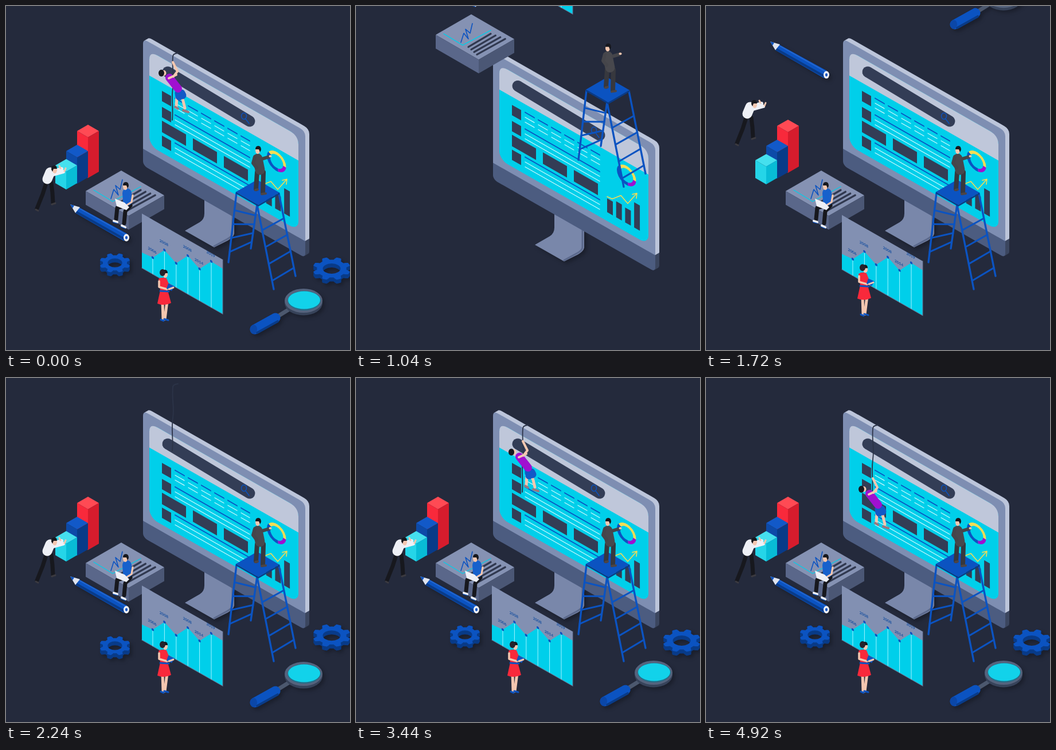
Write an HTML page that moves like this. It is 600 px wide and 600 px high and loops after 5200 ms.

```html
<!DOCTYPE html>
<html lang="en">
<head>
<meta charset="utf-8">
<title>Isometric analytics</title>
<style>
  html, body { margin: 0; width: 100%; height: 100%; overflow: hidden; background: #242a3c; }
  svg { display: block; width: 100%; height: 100%; }
  .shadow { filter: drop-shadow(4px 4px 3px #0004); }
  .line { fill: none; stroke-linecap: round; stroke-linejoin: round; }
  text { font: 700 6.5px Lato, "Open Sans", sans-serif; fill: #174f9f; text-anchor: middle; }
</style>
</head>
<body>
<svg id="stage" viewBox="0 0 600 600"></svg>
<script>
const BLUE = '#0b53c1', NAVY = '#093b88', CYAN = '#00cfea', DARK = '#333d56', SKIN = '#f4c7b0';
const GREY = '#8290b2', INK = '#17181e', WHITE = '#eef0f6', YELLOW = '#f3dd55', PURPLE = '#a010d0', RED = '#f8293b';
const LOOP = 5200, FRAME = 40, FALL = 600, SLOPE = .57;

const range = (count, make) => Array.from({ length: count }, (_, i) => make(i));
const repeat = (count, make) => range(count, make).join('');
const mix = (a, b, t) => a.map((value, i) => value + (b[i] - value) * t);

const path = (d, fill, more = '') => `<path d="${d}" fill="${fill}" ${more}/>`;
const line = (d, color, width, more = '') =>
  `<path class="line" d="${d}" stroke="${color}" stroke-width="${width}" ${more}/>`;
const oval = (x, y, rx, ry, fill, more = '') =>
  `<ellipse cx="${x}" cy="${y}" rx="${rx}" ry="${ry}" fill="${fill}" ${more}/>`;
const rect = (x, y, w, h, fill = DARK, r = 0) =>
  `<rect x="${x}" y="${y}" width="${w}" height="${h}" rx="${r}" fill="${fill}"/>`;
const tab = (x, y, w, h, r, fill) =>
  path(`M${x},${y + h}v${r - h}q0,${-r} ${r},${-r}h${w - 2 * r}q${r},0 ${r},${r}v${h - r}Z`, fill);
const iso = (x, y, content) => `<g transform="matrix(1 ${SLOPE} 0 1 ${x} ${y})">${content}</g>`;
const extrude = (depth, dx, dy, content) => repeat(depth, i =>
  `<g transform="translate(${dx * (depth - i)} ${dy * (depth - i)})">${content}</g>`);
const shaded = content => `<g class="shadow">${content}</g>`;

// Box seen from a corner; x, y is the back corner of its lid
function box(x, y, left, right, height, [lid, leftSide, rightSide]) {
  const dl = left * .577, dr = right * .577;
  return path(`M${x},${y}l${-left},${dl} ${right},${dr} ${left},${-dl}Z`, lid) +
    path(`M${x - left},${y + dl}l${right},${dr}v${height}l${-right},${-dr}Z`, leftSide) +
    path(`M${x + right},${y + dr}l${-left},${dl}v${height}l${left},${-dl}Z`, rightSide);
}

function gear(x, y, rx, ry) {
  const teeth = range(96, i => {
    const angle = i * Math.PI / 48;
    const reach = .89 + .11 * Math.max(-1, Math.min(1, -3 * Math.cos(8 * angle)));
    return [x + rx * reach * Math.cos(angle), y + ry * reach * Math.sin(angle)].map(n => n.toFixed(1));
  });
  const hx = rx * .47, hy = ry * .45;
  const hole = `M${x - hx},${y}a${hx},${hy} 0 1 0 ${2 * hx},0a${hx},${hy} 0 1 0 ${-2 * hx},0Z`;
  const layer = fill => path(`M${teeth.join('L')}Z${hole}`, fill, 'fill-rule="evenodd"');
  return shaded(extrude(7, 0, 1, layer(NAVY)) + layer(BLUE));
}

// facing: 1 looks right, -1 looks left
const head = (x, y, facing) =>
  oval(x + facing, y + 1, 4, 6, SKIN) + path(`M${x + 5 * facing},${y - 1}q0,-6 ${-5 * facing},-6t${-5 * facing},7l${2 * facing},4 ${2 * facing},-5Z`, INK);

function monitor() {
  const stand = line('M372,345V385', '#7987aa', 0) +
    path('M346,336L398,366V397Q397,403 387,409L363,421 312,392 338,377Q346,372 346,362Z', '#7987aa') +
    line('M395,366V396Q395,402 385,407L363,419', '#5b698c', 3);
  const shell = extrude(7, 1, -SLOPE, iso(239, 57, rect(0, 20, 283, 201, '#3b465f', 7) + tab(0, 0, 283, 192, 9, '#bcc5da'))) +
    iso(239, 57, rect(0, 20, 283, 201, '#4c5c80', 7) + tab(0, 0, 283, 192, 9, '#7e8eb2') +
      rect(11, 15, 260, 165, CYAN, 15) + tab(11, 15, 260, 43, 15, '#bfc7da'));
  const search = line('M282,115L425,201', DARK, 19) +
    oval(415, 192, 4.5, 5.5, 'none', `stroke="${BLUE}" stroke-width="1.5"`) + line('M418,197L424,205', BLUE, 1.5);
  const paragraph = (y, dash) => repeat(3, i =>
    line(`M23,${y + 8.5 * i}H153`, i ? '#d8fbff' : BLUE, i ? 1.3 : 2, `stroke-dasharray="${dash}"`));
  const page = paragraph(0, '16 7') + paragraph(29, '') + paragraph(78, '') +
    [0, 28, 78].map(y => rect(0, y, 16, 18)).join('') + repeat(3, i => rect(54 * i, 52, 42, 20));
  const bars = [24, 28, 26, 44].map((h, i) => rect(15.7 * i, -h, 10, h)).join('');
  const arc = (from, to, color, width) => {
    const at = degrees => [14 * Math.cos(degrees * Math.PI / 180), 14 * Math.sin(degrees * Math.PI / 180)];
    return line(`M${at(from)}A14,14 0 0 1 ${at(to)}`, color, width, 'style="stroke-linecap:butt"');
  };
  const ring = arc(80, 212, BLUE, 6) + arc(5, 80, PURPLE, 5) + arc(212, 365, YELLOW, 5);
  return shaded(stand) + shell + search + iso(272, 148, page) + iso(438, 335, bars) + iso(472, 271, ring) +
    line('M438,308L447,312 462,306 474,320 490,302M482,304L490,302 489,311', YELLOW, 1.6);
}

function ladder() {
  const side = (topA, footA, topB, footB, first) =>
    line(`M${topA}L${footA}M${topB}L${footB}`, BLUE, 3.4) + repeat(4, i => {
      const t = first + .2 * i;
      return line(`M${mix(topA, footA, t)}L${mix(topB, footB, t)}`, BLUE, 3);
    });
  const man = line('M438,290L436,319M449,290L448,325', '#37383e', 8) + line('M435,321L439,320M446,328L453,327', '#4d4546', 4) +
    line('M439,266L443,286', '#48484d', 17) + line('M434,263L431,274 437,282M449,266L459,263', '#45454a', 6) +
    head(440, 251, -1) + oval(461, 262, 2.5, 2, SKIN);
  return side([402, 326], [388, 447], [438, 346], [427, 423], .25) +
    side([438, 347], [467, 494], [476, 327], [505, 471], .3) + box(438, 303, 37, 39, 3, [BLUE, NAVY, NAVY]) + man;
}

const slab = () => box(201, 287, 62, 75, 24, ['#8592b3', '#5a678a', '#4b5775']) +
  line('M153,321L186,341 235,315', CYAN, 1.4) + line('M183,336L188,320 196,330 191,313 199,320 203,303', BLUE, 1.6) +
  repeat(4, i => line(`M${196 + 5 * i},${344 + 4.4 * i}L${235 + 8.4 * i},${321 + 3 * i}`, '#30384f', 3.2));

const sitter = () => line('M213,347L194,352 192,372M217,348L208,358 206,379', INK, 7) +
  line('M188,375L194,377M202,383L208,386', WHITE, 4) + line('M187,377L194,379M200,385L208,388', BLUE, 1.3) +
  line('M211,326L212,340', '#1761cc', 16) + line('M221,330L219,342 211,347', SKIN, 3.2) +
  path('M190,336L207,343 215,351 210,356 193,349Z', WHITE) + head(209, 314, -1);

function board() {
  const peaks = range(6, i => [19 + 20.4 * i, 57 - 6.7 * i + (i % 2 ? -9 : 9)]);
  const years = [2006, 2008, '', 2008, 2014, 2019];
  return iso(237, 362, rect(0, 0, 141, 95, GREY) + path(`M0,95V68L${peaks.join('L')}L141,16V95Z`, CYAN) +
    peaks.map(([x, y], i) => line(`M${x},${y}V95`, '#a5f4ff', 1) + oval(x, y, 2.2, 2.2, BLUE) +
      `<text x="${x - 1}" y="${y - 10}">${years[i]}</text>`).join('') + line('M0,95H141V0', '#667393', 1));
}

const woman = () => line('M273,515L274,546M281,515L277,546', SKIN, 5) +
  line('M270,547L275,549M276,546L283,548', BLUE, 3) +
  path('M266,476Q272,472 280,475L284,485 282,496 288,518Q276,524 264,519L269,496Z', RED) +
  line('M269,497L284,498', BLUE, 3) + line('M267,480V490L281,494', SKIN, 3.5) +
  path('M283,484L294,489 289,497 280,493Z', BLUE) + line('M284,494L292,491', SKIN, 3) +
  head(277, 467, 1) + oval(273, 465, 5, 6, '#26232b');

const columns = () => [
  [71, '#ff4a54', RED, '#d61c2d'], [46, '#1259c8', '#0d4aa8', NAVY], [31, '#45e0ee', '#25d5e8', '#08bcd6'],
].map(([height, ...colors], i) => box(143 - 19 * i, 278 + 10 * i - height, 19, 19, height, colors)).join('');

const pusher = () => line('M70,309L64,328 54,353M79,309L81,326 82,343', INK, 7) +
  line('M52,355L56,357M80,346L86,344', '#3b3a40', 3) + line('M77,290L72,302', WHITE, 17) +
  line('M83,288L97,284M82,294L100,289', WHITE, 6) + line('M95,283L93,279M102,288L104,283', SKIN, 3) + head(84, 285, 1);

const pencil = () => shaded(path('M127,351L211,397 206,410 121,361Z', BLUE) + line('M122,359L207,407', NAVY, 4) +
  line('M128,353L210,399', '#2467d0', 2) + path('M112,346L129,351 121,361Z', '#dfe4ef') +
  path('M112,346L119,348 116,353Z', BLUE) + oval(210, 404, 5, 6.5, WHITE) + oval(210, 404, 2, 2.8, BLUE));

const magnifier = () => shaded(line('M497,527L476,540', '#4c586e', 7) + line('M470,544L434,564', BLUE, 17) +
  line('M474,550L438,570', NAVY, 4) + oval(432, 564, 6, 8, '#0b47a8') +
  oval(519, 518, 33, 21.5, '#37435a') + oval(519, 514, 33, 21, '#55637d') +
  oval(520, 514, 29, 17, '#26708a') + oval(520, 513, 28, 15.5, '#12d2ea'));

const rope = () => line('M300,82Q291,83 291,88C289,112 294,120 291,142S292,175 290,199', '#2c3448', 1.8);

const climber = () => line('M298,160L297,175M307,158L312,178', SKIN, 5) +
  line('M295,176L300,179M309,182L318,185', '#9a7780', 4) + line('M301,152L302,158M306,152L308,156', '#1258c6', 13) +
  line('M285,125L300,144', PURPLE, 14) + line('M292,123L299,114 291,98M284,126L297,120', SKIN, 4) +
  oval(275, 117, 4.5, 5, SKIN) + oval(271, 117, 5, 6, INK);

// Acts in time order, which is also back to front; parts of an act start one step apart
const acts = [
  { start: 725, step: 0, duration: 760, parts: [monitor] },
  { start: 893, step: 42, duration: 740, parts: [ladder, slab, sitter, board] },
  { start: 1520, step: 62, duration: 560,
    parts: [() => columns() + woman(), pusher, pencil, magnifier, () => gear(190, 448, 27, 17)] },
  { start: 2040, step: 41, duration: 560, parts: [() => gear(568, 458, 33, 20), rope] },
  { start: 2266, step: 0, duration: 560, parts: [climber] },
];
const stage = document.getElementById('stage');
const parts = acts.flatMap(({ start, step, duration, parts }) =>
  parts.map((draw, i) => ({ draw, start: start + step * i, duration })));
stage.innerHTML = parts.map(({ draw }) => `<g>${draw()}</g>`).join('');
const groups = [...stage.children];

const progress = (time, start, duration) => Math.min(1, Math.max(0, (time - start) / duration));

// Falls from above, overshoots and settles back
function drop(time, start, duration) {
  const left = 1 - progress(time, start, duration);
  return FALL * (1.7 * left ** 2 - 2.7 * left ** 3);
}

const descent = time => 77 * (1 - Math.cos(Math.PI * progress(time, 3030, 1570))) / 2;

function render(now) {
  const time = Math.floor(now % LOOP / FRAME) * FRAME;
  const complete = time < 240;
  parts.forEach(({ draw, start, duration }, i) => {
    const y = complete ? 0 : drop(time, start, duration) + (draw === climber ? descent(time) : 0);
    groups[i].setAttribute('transform', `translate(0 ${y.toFixed(2)})`);
    groups[i].setAttribute('visibility', complete || time > start ? 'visible' : 'hidden');
  });
}

const began = performance.now();
function tick() {
  render(performance.now() - began);
  requestAnimationFrame(tick);
}
tick();
</script>
</body>
</html>
```
